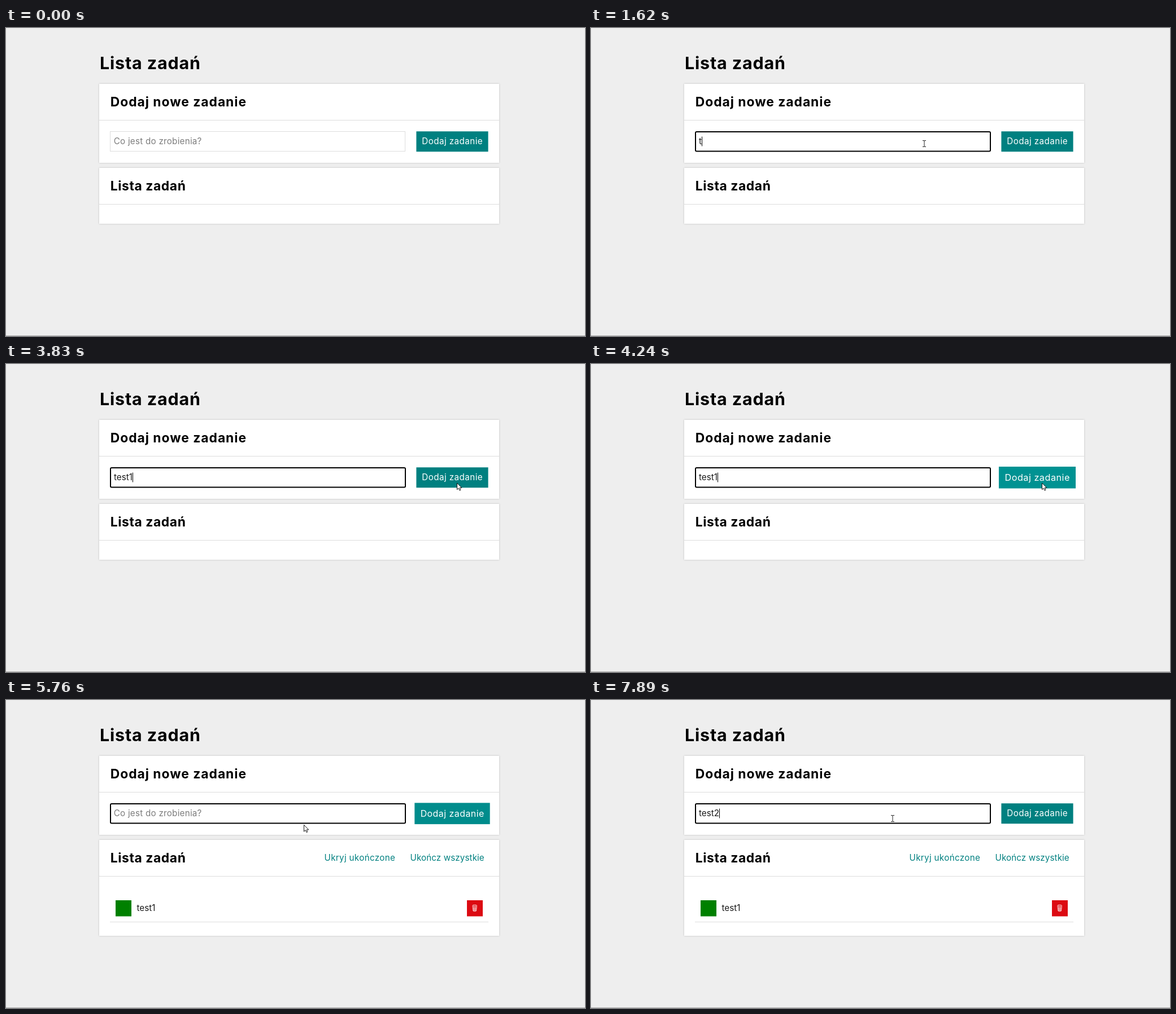
Recreate the animation shown at these times as an HTML page. Size 1025 px wide and 546 px high, loop 8000 ms.

```html
<!DOCTYPE html>
<html lang="pl">
<head>
<meta charset="utf-8">
<title>Lista zadań</title>
<style>
  html, body { margin: 0; height: 100%; overflow: hidden; background: #eee; }
  svg { display: block; width: 1025px; height: 546px; font: 15.2px Inter, "Open Sans", sans-serif; }
  text { white-space: pre; }
  .title { font-weight: 700; }
  .main { font-size: 30.4px; letter-spacing: .85px; }
  .section { font-size: 22.8px; }
  .card { fill: #fff; filter: drop-shadow(0 0 1.5px #bbb); }
  .rule { stroke: #ddd; }
  .link { fill: #008080; }
  .task { fill: #1a1a1a; }
</style>
</head>
<body>
<svg viewBox="0 0 1025 546">
  <rect width="1025" height="546" fill="#eee"/>
  <path d="M0 545.5H1025" stroke="#aaa"/>
  <text class="title main" x="166" y="73">Lista zadań</text>

  <rect class="card" x="165" y="99" width="708" height="140"/>
  <path class="rule" d="M165 163.5H873"/>
  <text class="title section" x="184.7" y="139" letter-spacing="1">Dodaj nowe zadanie</text>
  <rect id="field" fill="#fff"/>
  <text id="entry" class="task" x="191" y="206"></text>
  <text id="hint" x="190.7" y="206" fill="#7c7c7c" letter-spacing=".25">Co jest do zrobienia?</text>
  <path id="caret" d="M.5 192.5V209.5" stroke="#000"/>
  <g id="button">
    <rect x="-63.6" y="-18" width="127.2" height="36"/>
    <text x=".2" y="5" fill="#fff" text-anchor="middle" letter-spacing=".45">Dodaj zadanie</text>
  </g>

  <rect id="listCard" class="card" x="165" y="248" width="708" height="99"/>
  <path class="rule" d="M165 312.5H873"/>
  <text class="title section" x="184.7" y="288" letter-spacing=".62">Lista zadań</text>
  <g id="task">
    <text class="link" x="563.5" y="285" letter-spacing=".33">Ukryj ukończone</text>
    <text class="link" x="715.5" y="285" letter-spacing=".1">Ukończ wszystkie</text>
    <rect x="194" y="355" width="28" height="28.5" fill="#008000"/>
    <text class="task" x="231.5" y="374">test1</text>
    <rect x="816" y="355" width="28" height="28.5" fill="#dc0a12"/>
    <g fill="none" stroke="#fff" stroke-width=".9">
      <ellipse cx="829.7" cy="364.6" rx="4" ry="1.3"/>
      <path d="M826 365.5L827 374Q829.7 375.4 832.4 374L833.4 365.5M828.3 366.5L828.7 374M831.1 366.5L830.7 374M826.5 369H833M826.8 372H832.7" stroke-width=".8"/>
    </g>
    <path class="rule" d="M184 393.5H854"/>
  </g>

  <g id="pointer">
    <path id="arrow" d="M.5 .5V12.2L3.2 9.7L5 13.7L6.9 12.9L5.2 9H8.8Z" fill="#fff" stroke="#000" stroke-width=".9"/>
    <path id="beam" d="M-3 -5.5H-1Q0 -5.5 0 -4.5Q0 -5.5 1 -5.5H3M0 -4.5V4.5M-3 5.5H-1Q0 5.5 0 4.5Q0 5.5 1 5.5H3" fill="none" stroke="#222"/>
    <circle id="click" r="11.5" fill="#ff0" opacity=".5"/>
  </g>
</svg>
<script>
const LOOP = 8000, BLINK = 530;
const $ = id => document.getElementById(id);
const [field, entry, hint, caret, button, listCard, task, pointer, arrow, beam, click] =
  ['field', 'entry', 'hint', 'caret', 'button', 'listCard', 'task', 'pointer', 'arrow', 'beam', 'click'].map($);

// Each entry restarts the caret blink: [time, field text]
const typing = [
  [670, ''], [1620, 't'], [1750, 'te'], [1950, 'tes'], [2070, 'test'], [2680, 'test1'],
  [4940, ''], [6770, 't'], [6970, 'te'], [7100, 'tes'], [7240, 'test'], [7890, 'test2']
];
// Pointer path: [time, x, y]
const path = [
  [130, 864, 463], [250, 800, 385], [400, 665, 265], [560, 590, 205],
  [3050, 590, 205], [3120, 680, 211], [3240, 863, 235.5], [3340, 888, 236], [3600, 880, 234],
  [3720, 858, 224], [3830, 798, 210.5],
  [5400, 798, 210.5], [5500, 735, 228], [5640, 605, 236], [5760, 527, 221], [5960, 522, 213], [6230, 534, 210]
];

const show = (el, on) => el.setAttribute('visibility', on ? 'visible' : 'hidden');
const setAll = (el, attrs) => { for (const k in attrs) el.setAttribute(k, attrs[k]); };
const between = (v, a, b) => v >= a && v < b;

// CSS "ease" curve: cubic-bezier(.25, .1, .25, 1)
function ease(x) {
  if (x <= 0 || x >= 1) return x <= 0 ? 0 : 1;
  const curve = (u, a, b) => 3 * a * u * (1 - u) ** 2 + 3 * b * u * u * (1 - u) + u ** 3;
  let lo = 0, hi = 1;
  for (let i = 0; i < 20; i++) {
    const mid = (lo + hi) / 2;
    if (curve(mid, .25, .25) < x) lo = mid; else hi = mid;
  }
  return curve(lo, .1, 1);
}

function pointerAt(t) {
  const next = path.findIndex(p => p[0] > t);
  if (next < 0) return path[path.length - 1].slice(1);
  if (next === 0) return path[0].slice(1);
  const a = path[next - 1], b = path[next], f = (t - a[0]) / (b[0] - a[0]);
  return [a[1] + (b[1] - a[1]) * f, a[2] + (b[2] - a[2]) * f];
}

function drawField(t) {
  const [since, text] = typing.filter(k => k[0] <= t).pop() || [0, ''];
  const focused = t >= 670 && !between(t, 4760, 4940);
  setAll(field, focused
    ? { x: 185, y: 184, width: 522, height: 34.5, rx: 2, stroke: '#000', 'stroke-width': 2 }
    : { x: 184.5, y: 183.5, width: 522, height: 35, rx: 0, stroke: '#ddd', 'stroke-width': 1 });
  entry.textContent = text;
  show(hint, !text);
  show(caret, focused && Math.floor((t - since) / BLINK) % 2 === 0);
  const width = text ? entry.getComputedTextLength() : 0;
  caret.setAttribute('transform', `translate(${Math.round(191 + width)})`);
}

function drawButton(t) {
  const hover = ease((t - 3830) / 1000) - ease((t - 5460) / 1000);
  const level = Math.round(128 * (1 + .2 * hover));
  setAll(button, {
    transform: `translate(790 201.25) scale(${1 + .1 * hover})`,
    fill: `rgb(0,${level},${level})`
  });
}

function drawPointer(t) {
  const [x, y] = pointerAt(t);
  const visible = t >= 130, overField = between(x, 184, 708) && between(y, 183, 220);
  pointer.setAttribute('transform', `translate(${x} ${y})`);
  show(arrow, visible && !overField);
  show(beam, visible && overField);
  show(click, between(t, 610, 760) || between(t, 4760, 5010));
}

function frame(now) {
  const t = now % LOOP, added = t >= 4940;
  drawField(t);
  drawButton(t);
  drawPointer(t);
  listCard.setAttribute('height', added ? 170 : 99);
  show(task, added);
  requestAnimationFrame(frame);
}
requestAnimationFrame(frame);
</script>
</body>
</html>
```
